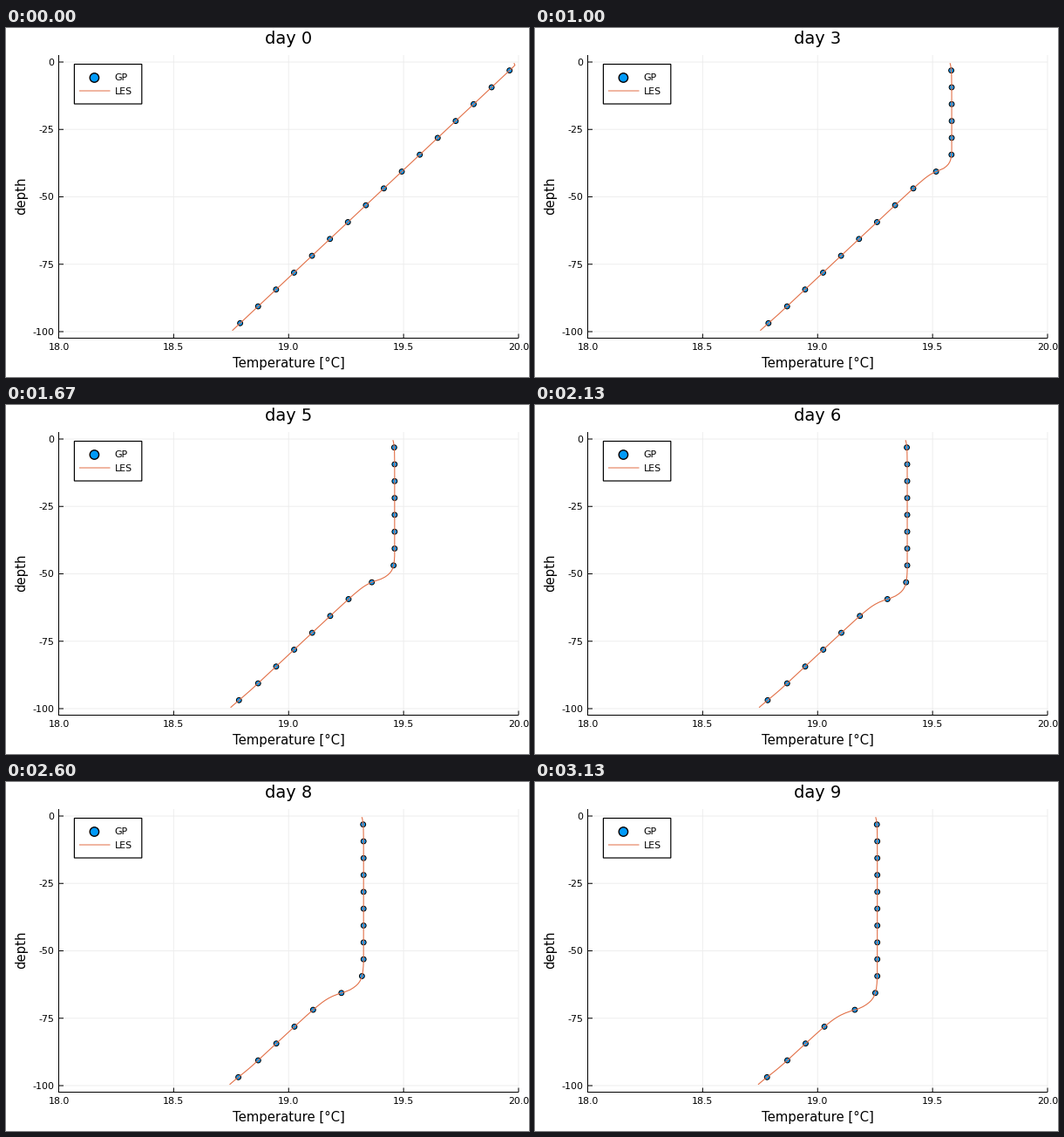
Write a matplotlib script that moves like this. It is 600 px wide and 400 px high and loops after 3.19 s.

```python
import numpy as np
import matplotlib.pyplot as plt
from matplotlib.animation import FuncAnimation
from matplotlib.patches import Circle, Rectangle

W, H, DPI = 600, 400, 100
LOOP_MS, TICK_MS, FPS = 3190, 10, 15
DAYS_PER_STEP = 10 / 48
BLUE, ORANGE, GRID = "#009af9", "#e26f46", "#eeeeee"
LEFT, RIGHT, TOP, BOTTOM = 60.5, 588, 31, 355.5

plt.rcParams["font.family"] = "DejaVu Sans"


def pt(px):
    return px * 72 / DPI


def x_px(temp):
    return LEFT + (temp - 18) * (RIGHT - LEFT) / 2


def y_px(z):
    return 39 - 3.09 * z


def temperature(z, day):
    """Mixed layer that cools and deepens into a linear stratification."""
    drop = 0.235 * day**0.503
    mixed = 20 - drop
    base = drop / 0.0125 * (1.204 - 0.15 * np.exp(-day / 1.3))
    width = (1.3 + 0.1 * day) * (1 - np.exp(-8 * day)) + 0.01
    # The transition is softer above the base than below it
    u = (z + base) / np.where(z > -base, 2 * width, width)
    weight = 0.5 * (1 + u / np.sqrt(1 + u**2))
    below = np.minimum(20 + 0.0125 * z, mixed)
    temp = below + (mixed - below) * weight

    start = np.exp(-20 * day)
    chill = (0.009 + 0.046 * start) * np.exp(z / (2 - 1.7 * start))
    floor = 0.00152 * day * np.exp(-(((z + 100) / 5) ** 2))
    return temp - chill - floor


def cell_centers(n):
    return -(np.arange(n) + 0.5) * 100 / n


fig = plt.figure(figsize=(W / DPI, H / DPI), dpi=DPI, facecolor="white")
ax = fig.add_axes([0, 0, 1, 1])
ax.set_xlim(0, W)
ax.set_ylim(H, 0)
ax.axis("off")


def stroke(xs, ys, color="black", width=1, z=2):
    return ax.plot(xs, ys, color=color, lw=pt(width), zorder=z, snap=False,
                   solid_capstyle="butt")[0]


def dot(x, y, radius, edge, z):
    return ax.add_patch(Circle((x, y), radius, fc=BLUE, ec="black",
                               lw=pt(edge), zorder=z))


def label(x, y, text, size, ha="center", **kw):
    return ax.text(x, y, text, fontsize=pt(size), ha=ha, va="baseline",
                   zorder=8, **kw)


# Grid, ticks and axes
for temp in np.arange(18, 20.1, 0.5):
    x = x_px(temp)
    stroke([x, x], [TOP, BOTTOM], GRID, z=1)
    stroke([x, x], [BOTTOM, BOTTOM - 5])
    label(x, 369, f"{temp:.1f}", 11)
for z in range(0, -101, -25):
    y = y_px(z)
    stroke([LEFT, RIGHT], [y, y], GRID, z=1)
    stroke([LEFT, LEFT + 5.5], [y, y])
    label(55.5, y + 3.8, str(z), 11, "right")
stroke([LEFT, LEFT], [TOP, BOTTOM + 0.5])
stroke([LEFT - 0.5, RIGHT], [BOTTOM, BOTTOM])
label(324.5, 388.6, "Temperature [°C]", 14.85)
label(22.2, 192.2, "depth", 14.95, rotation=90, rotation_mode="anchor")
title = label(324.3, 17.7, "", 19.4)

# Legend
ax.add_patch(Rectangle((78.4, 41.5), 77.4, 45.5, fc="white", ec="black",
                       lw=pt(1.2), zorder=6, snap=False))
dot(101.4, 57, 5.2, 1.4, 7)
stroke([84, 119.5], [72, 72], ORANGE, z=7)
label(124.5, 60.5, "GP", 11, "left")
label(124.5, 75.6, "LES", 11, "left")

fine, coarse = cell_centers(128), cell_centers(16)
gp = [dot(0, 0, 2.9, 1, 3) for _ in coarse]
les = stroke([], [], ORANGE, 1.1, 4)


def draw(tick):
    # Steps at 15 per second, each starting on the nearest 10 ms
    step = (tick * TICK_MS + 4) * FPS // 1000
    day = step * DAYS_PER_STEP
    les.set_data(x_px(temperature(fine, day)), y_px(fine))
    for c, temp, z in zip(gp, temperature(coarse, day), coarse):
        c.center = x_px(temp), y_px(z)
    title.set_text(f"day {int(day)}")
    return [les, title, *gp]


anim = FuncAnimation(fig, draw, frames=LOOP_MS // TICK_MS, interval=TICK_MS,
                     repeat=True, repeat_delay=0, blit=False)
plt.show()
```
